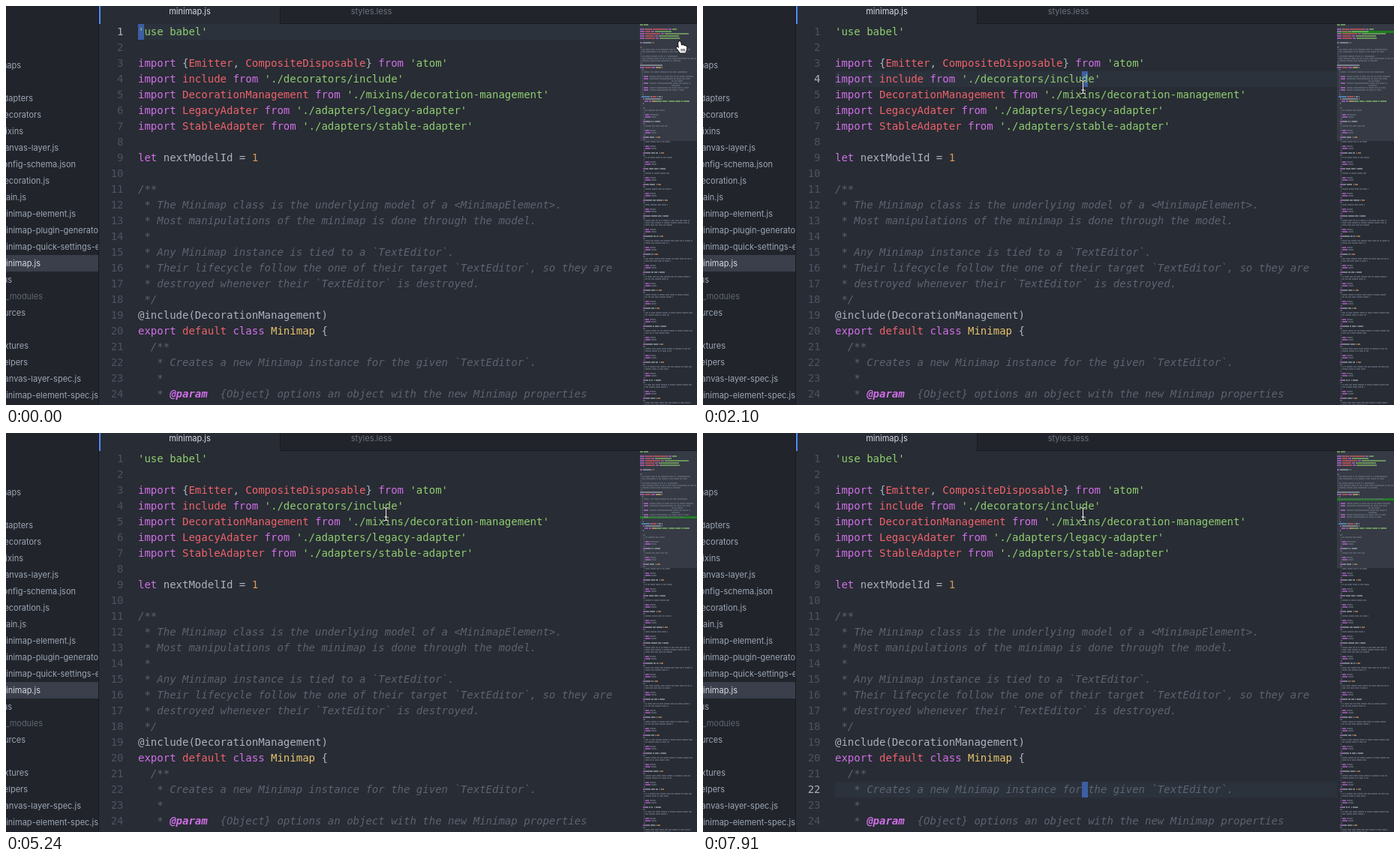
An HTML page with a canvas for the animation above (8 s loop, 921x532 px).

```html
<!DOCTYPE html>
<html lang="en">
<head>
<meta charset="utf-8">
<title>Minimap cursor line</title>
<style>
html, body { margin: 0; width: 100%; height: 100%; overflow: hidden; background: #282c34; }
canvas { display: block; width: 921px; height: 532px; }
</style>
</head>
<body>
<canvas id="stage" width="921" height="532"></canvas>
<script>
const W = 921, H = 532, LOOP = 8000;
const TOP = 24, ROW = 21, CODE_X = 176, MAP_X = 845, MAP_ROW = 3;
const MONO = '"DejaVu Sans Mono", monospace';
const UI = '11px Inter, sans-serif';
const COLORS = {
  f: '#abb2bf', k: '#d070e8', r: '#ee626c', g: '#8fcd70',
  o: '#d9995b', y: '#e9c46f', c: '#5c6370', p: '#d070e8', b: '#61afef'
};

// ^x switches the colour of the text that follows
const source = [
  "^g'use babel'",
  "",
  "^kimport ^f{^rEmitter^f, ^rCompositeDisposable^f} ^kfrom ^g'atom'",
  "^kimport ^rinclude ^kfrom ^g'./decorators/include'",
  "^kimport ^rDecorationManagement ^kfrom ^g'./mixins/decoration-management'",
  "^kimport ^rLegacyAdater ^kfrom ^g'./adapters/legacy-adapter'",
  "^kimport ^rStableAdapter ^kfrom ^g'./adapters/stable-adapter'",
  "",
  "^klet ^fnextModelId = ^o1",
  "",
  "^c/**",
  "^c * The Minimap class is the underlying model of a <MinimapElement>.",
  "^c * Most manipulations of the minimap is done through the model.",
  "^c *",
  "^c * Any Minimap instance is tied to a `TextEditor`.",
  "^c * Their lifecycle follow the one of their target `TextEditor`, so they are",
  "^c * destroyed whenever their `TextEditor` is destroyed.",
  "^c */",
  "^f@include(DecorationManagement)",
  "^kexport ^rdefault ^kclass ^yMinimap ^f{",
  "^c  /**",
  "^c   * Creates a new Minimap instance for the given `TextEditor`.",
  "^c   *",
  "^c   * ^p@param^c  {Object} options an object with the new Minimap properties",
  "^c   * ^p@param^c  {TextEditor} options.textEditor the target text editor",
  "^c   *" + " ".repeat(38) + "for the minimap",
  "^c   * ^p@param^c  {Boolean} [options.standAlone] whether this minimap is",
  "^c   *" + " ".repeat(38) + "stand-alone",
  "^c   * ^p@param^c  {Number} [options.width] the minimap width in pixels",
  "^c   * ^p@param^c  {Number} [options.height] the height in pixels",
  "^c   *",
  "^c   */",
  "^b  constructor ^f(^roptions^f = {}) {",
  "^k    if ^f(!options.textEditor) {",
  "^k      throw new ^yError^f(^g'Cannot create a minimap without an editor'^f)",
  "^f    }",
  "",
  "^c    /**",
  "^c     * The Minimap's text editor.",
  "^c     *",
  "^c     * ^p@type^c {TextEditor}",
  "^c     * ^p@access^c private",
  "^c     */"
];

let seed = 11;
const rnd = () => (seed = (seed * 16807) % 2147483647) / 2147483647;
function words(length) {
  let s = '';
  while (s.length < length) s += 'x'.repeat(2 + Math.floor(rnd() * 7)) + ' ';
  return s.slice(0, length);
}
for (let block = 0; source.length < 172; block++) {
  const extra = block < 6 ? 0 : block === 6 ? 2 : 1;
  source.push('^k    this^f.' + words(8 + rnd() * 14) + (block % 3 ? '^f = ^onull' : '^f = options'));
  source.push('^c    /**');
  for (let i = 0; i < extra; i++) source.push('^c     * ' + words(58 + rnd() * 6));
  source.push('^c     * ' + words(30 + rnd() * 8));
  source.push('^c     *', '^c     * ^p@type^c {Number}', '^c     * ^p@access^c private', '^c     */');
}

const lines = source.map(text => {
  const parts = text.split(/\^(.)/);
  const runs = [];
  let col = 0;
  for (let i = 1; i < parts.length; i += 2) {
    runs.push({ style: parts[i], text: parts[i + 1], col });
    col += parts[i + 1].length;
  }
  return { runs, length: col };
});

// Each step changes part of the state and holds until the next one
const steps = [
  [0, { line: 1, col: 0, caret: true, cursor: 'hand', x: 898, y: 47, popup: false, on: false }],
  [150, { x: 910, y: 27 }],
  [600, { popup: true, caret: false }],
  [750, { cursor: 'arrow', x: 872, y: 44 }],
  [900, { x: 806, y: 58 }],
  [1050, { x: 763, y: 63 }],
  [1200, { x: 750, y: 63 }],
  [1500, { on: true }],
  [1650, { x: 728, y: 68 }],
  [1800, { cursor: 'beam', x: 598, y: 96 }],
  [1950, { x: 506, y: 108 }],
  [2100, { popup: false, caret: true, line: 4, col: 39 }]
];
const lineMoves = [
  [3150, 5], [3750, 7], [3900, 12], [4040, 16], [4190, 20], [4340, 25], [4490, 29],
  [5240, 30], [5830, 32], [5980, 37], [6130, 41], [6270, 46], [6570, 45],
  [7160, 43], [7310, 39], [7460, 35], [7610, 30], [7760, 26], [7910, 22]
];
for (const [t, line] of lineMoves) steps.push([t, { line }]);

const ctx = document.getElementById('stage').getContext('2d', { alpha: false });

function rect(x, y, w, h, color, c = ctx) {
  c.fillStyle = color;
  c.fillRect(x, y, w, h);
}
function label(text, x, yMid, color, align = 'left', font = UI) {
  ctx.font = font;
  ctx.textAlign = align;
  ctx.fillStyle = color;
  ctx.fillText(text, x, yMid + 4);
}
function shape(points, fill, stroke, width) {
  ctx.beginPath();
  points.forEach(([x, y]) => ctx.lineTo(x, y));
  if (fill) { ctx.closePath(); ctx.fillStyle = fill; }
  ctx.strokeStyle = stroke;
  ctx.lineWidth = width;
  ctx.lineJoin = 'round';
  ctx.stroke();
  if (fill) ctx.fill();
}

const files = [
  ['keymaps', 79, 20], ['adapters', 123, 36], ['decorators', 145, 47], ['mixins', 167, 23],
  ['canvas-layer.js', 189, 70], ['config-schema.json', 211, 93], ['decoration.js', 233, 58],
  ['main.js', 255, 27], ['minimap-element.js', 277, 93],
  ['minimap-plugin-generator-element.js', 299], ['minimap-quick-settings-element.js', 321],
  ['minimap.js', 343, 46], ['menus', 365, 8], ['node_modules', 387, 49], ['resources', 409, 26],
  ['fixtures', 453, 30], ['helpers', 475, 29], ['canvas-layer-spec.js', 497, 100],
  ['minimap-element-spec.js', 519, 123]
];

function drawSidebar() {
  rect(0, 0, 124, H, '#21252b');
  rect(0, 332, 123, 22, '#3a3f4b');
  ctx.save();
  ctx.beginPath();
  ctx.rect(0, 0, 123, H);
  ctx.clip();
  ctx.font = UI;
  const left = 93 - ctx.measureText('minimap-element.js').width;
  for (const [name, y, end] of files) {
    const color = name === 'minimap.js' ? '#d7dae0' : name === 'node_modules' ? '#5f6671' : '#9da5b4';
    label(name, end || left, y, color, end ? 'right' : 'left');
  }
  ctx.restore();
  rect(123, 0, 1, H, '#181a1f');
}

function drawTabs() {
  rect(365, 0, W - 365, TOP, '#21252b');
  rect(365, 0, 1, TOP, '#181a1f');
  rect(365, TOP - 1, W - 365, 1, '#181a1f');
  rect(124, 0, 2, TOP, '#528bff');
  label('minimap.js', 245, 7, '#d7dae0', 'center');
  label('styles.less', 487, 7, '#6b727e', 'center');
}

function drawCode(s) {
  ctx.font = '14px ' + MONO;
  const cw = ctx.measureText('m').width;
  const y = TOP + (s.line - 1) * ROW;
  rect(CODE_X, y, MAP_X - CODE_X, ROW, '#2c323c');
  if (s.caret) {
    const col = Math.min(s.col, lines[s.line - 1].length);
    rect(Math.round(CODE_X + col * cw), y, 8, ROW, '#3e5ea3');
  }
  for (let n = 1; n <= 25; n++) {
    const mid = TOP + (n - 1) * ROW + 11;
    label(n, 156.5, mid, n === s.line ? '#abb2bf' : '#4b5363', 'right', '14px ' + MONO);
    for (const run of lines[n - 1].runs) {
      const kind = run.style === 'c' ? 'italic ' : run.style === 'p' ? 'italic bold ' : '';
      label(run.text, CODE_X + run.col * cw, mid, COLORS[run.style], 'left', kind + '14px ' + MONO);
    }
  }
}

const mapText = document.createElement('canvas');
mapText.width = W - MAP_X;
mapText.height = H - TOP;
function paintMapText() {
  const c = mapText.getContext('2d');
  lines.forEach((line, i) => {
    for (const run of line.runs) {
      c.globalAlpha = run.style === 'c' ? 0.75 : 0.6;
      for (const m of run.text.matchAll(/\S+/g))
        rect(run.col + m.index, i * MAP_ROW, m[0].length, 2, COLORS[run.style], c);
    }
  });
}

function drawMinimap(s) {
  rect(MAP_X, TOP, W - MAP_X, H - TOP, '#282c34');
  rect(MAP_X, TOP, W - MAP_X, 156, '#353a44');
  if (s.on) rect(MAP_X, TOP + (s.line - 1) * MAP_ROW, W - MAP_X, MAP_ROW, '#1e801f');
  ctx.drawImage(mapText, MAP_X, TOP);
}

const options = [
  ['bookmarks', 39], ['cursorline', 61], ['find-and-replace', 83, true], ['git-diff', 105, true],
  ['linter', 127, true], ['selection', 149, true], ['code-highlights', 172, true], ['absolute-mode', 194]
];

function drawPopup(s) {
  ctx.save();
  ctx.shadowColor = 'rgba(0,0,0,.45)';
  ctx.shadowBlur = 7;
  ctx.shadowOffsetY = 2;
  rect(646, 25, 197, 207, '#21252b');
  ctx.restore();
  rect(646, 25, 197, 207, '#23272e');
  for (const [name, y, checked] of options) {
    const hover = s.cursor === 'arrow' && s.x > 649 && s.x < 840 && Math.abs(s.y - y) < 11;
    const first = name === 'bookmarks';
    const tick = checked || (name === 'cursorline' && s.on);
    if (first || hover) rect(649, y - 11, 192, 22, first ? '#3a3f4b' : '#2c313a');
    label(name, tick ? 673 : 672, y, first ? '#d7dae0' : '#9da5b4');
    if (tick) shape([[654, y], [657, y + 3], [663, y - 4]], null, '#73c990', 2.4);
  }
  rect(649, 160, 192, 1, '#30353e');
  rect(649, 205, 191, 24, '#181a1f');
  rect(650, 206, 94, 22, '#3a3f4a');
  rect(745, 206, 94, 22, '#528bff');
  label('On Left', 697, 217, '#9da5b4', 'center');
  label('On Right', 792, 217, '#ffffff', 'center', '600 ' + UI);
}

const cursors = {
  arrow() {
    shape([[0, 0], [0, 14], [3.2, 11], [5.6, 16.4], [8, 15.3], [5.6, 10], [10, 10]], '#000', '#fff', 2);
  },
  hand() {
    shape([[-1, 0], [1, 0.5], [2.2, 5.5], [4.5, 5], [6, 6], [8, 6.2], [9.5, 8], [8.7, 12], [7.5, 15.5],
      [0.5, 15.5], [-2, 12], [-4.5, 9], [-4, 7.5], [-1.2, 9], [-2, 3]], '#fff', '#000', 1.4);
    for (const x of [2, 4.2, 6.2]) shape([[x, 10], [x + 0.2, 13.5]], null, '#000', 0.8);
  },
  beam() {
    const strokes = [[[-3, -9], [0.5, -7.5], [4, -9]], [[0.5, -7.5], [0.5, 8]],
      [[-3, 9.5], [0.5, 8], [4, 9.5]], [[-1.5, 4], [2.5, 4]]];
    for (const [color, width] of [['rgba(0,0,0,.6)', 3], ['#f4f4f4', 1.2]])
      strokes.forEach(p => shape(p, null, color, width));
  }
};

function draw(s) {
  rect(0, 0, W, H, '#282c34');
  drawCode(s);
  drawSidebar();
  drawTabs();
  drawMinimap(s);
  if (s.popup) drawPopup(s);
  ctx.save();
  ctx.translate(s.x, s.y);
  cursors[s.cursor]();
  ctx.restore();
}

function frame() {
  const t = performance.now() % LOOP;
  draw(Object.assign({}, ...steps.filter(([at]) => at <= t).map(([, change]) => change)));
  requestAnimationFrame(frame);
}
paintMapText();
frame();
</script>
</body>
</html>
```
